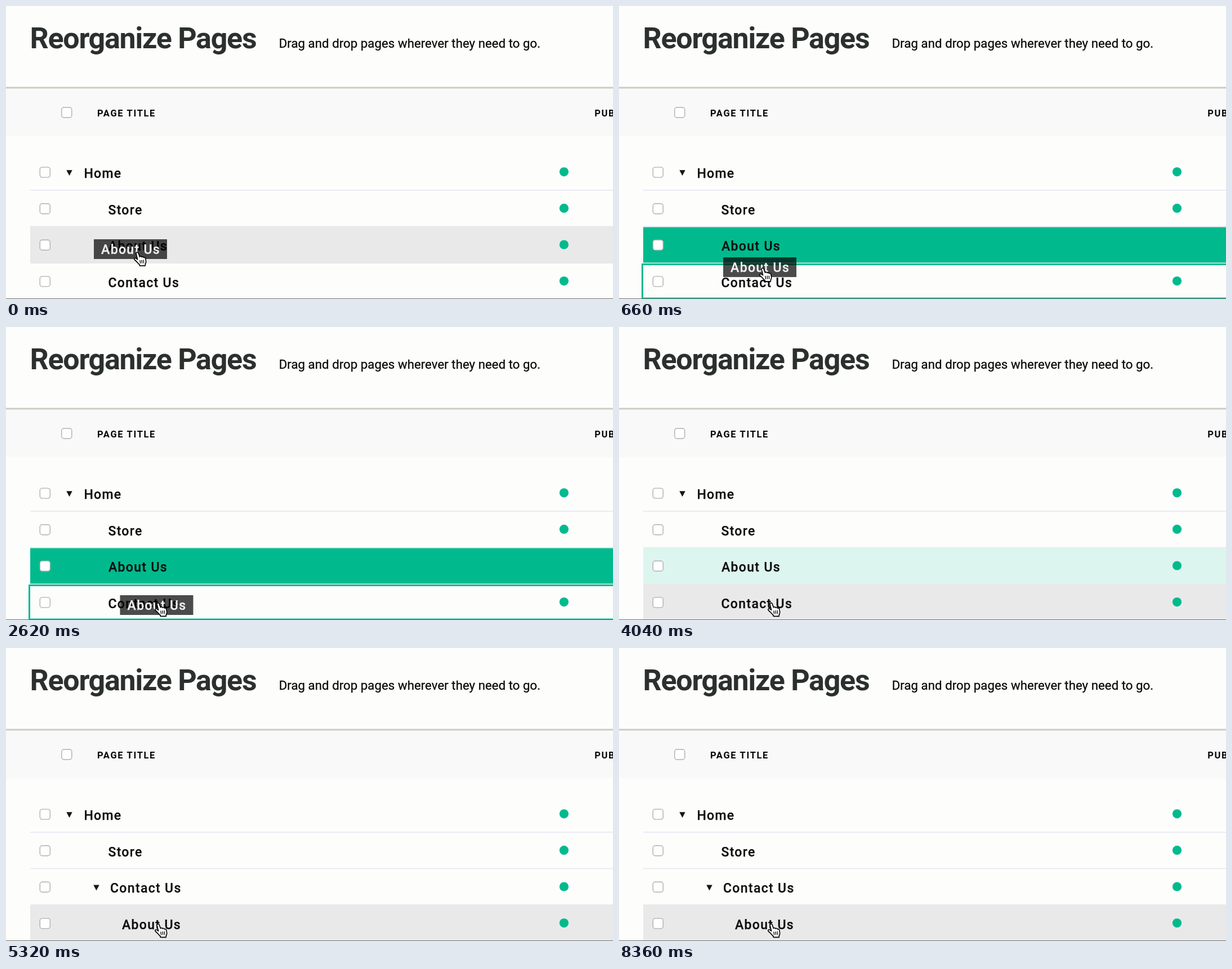
An HTML page for the animation above (8400 ms loop, 1078 by 520 pixels).

```html
<!DOCTYPE html>
<html lang="en">
<head>
<meta charset="utf-8">
<title>Reorganize Pages</title>
<style>
  html, body { margin: 0; width: 100%; height: 100%; overflow: hidden; background: #fdfdfc; }
  svg { display: block; width: 1078px; height: 520px; font-family: Roboto, Arial, sans-serif; }
  .title { font-size: 52px; font-weight: 700; letter-spacing: -1.3px; fill: #2b302f; }
  .lead { font-size: 22.3px; fill: #0b0b0b; stroke: #0b0b0b; stroke-width: .3px; }
  .head { font-size: 16.5px; font-weight: 700; letter-spacing: 1.65px; fill: #080808; }
  .row { font-size: 23px; font-weight: 500; letter-spacing: 1.33px; fill: #0d0d0d; stroke: #0d0d0d; stroke-width: .25px; }
  .light { fill: #f2f2f2; stroke: #f2f2f2; }
  .rule { fill: #e7e9f2; }
  .box { fill: #fff; stroke: #b0b0b0; stroke-width: 1.4; }
  .green { fill: #00ba8d; }
  .arrow { fill: #161616; }
</style>
</head>
<body>
<svg viewBox="0 0 1078 520" xmlns="http://www.w3.org/2000/svg">
  <defs>
    <path id="handShape" d="M4.2 4.2C3.4 1.4 7 .1 8.1 2.8L10.5 9.3C11.2 8 13.6 8.1 14 9.8C15 8.8 17 9.1 17.4 10.7C18.8 9.9 20.5 10.8 20.8 12.6L21.6 17C22 19.6 20.8 21 20.3 22.6V25H10.2V23.3C7.3 20.8 5.3 17.4 1.5 14.7C-.3 13.1 1.7 10.7 4 12.1L6.6 14Z"/>
  </defs>
  <rect width="1078" height="520" fill="#fdfdfc"/>
  <text class="title" x="42.6" y="75">Reorganize Pages</text>
  <text class="lead" x="484.7" y="74">Drag and drop pages wherever they need to go.</text>

  <rect y="147" width="1078" height="84" fill="#f9f9f9"/>
  <rect y="143.5" width="1078" height="3" fill="#cbcdc5"/>
  <text class="head" x="162" y="196.2">PAGE TITLE</text>
  <text class="head" x="1045.3" y="196.2">PUB</text>

  <g id="rules"></g>
  <rect id="hoverAbout" x="43" y="391" width="1035" height="66" fill="#e9e9e9"/>
  <rect id="dragged" class="green" x="43" y="392.5" width="1035" height="63"/>
  <g id="dropped">
    <rect x="43" y="391" width="1035" height="66" fill="#dcf5ee"/>
    <rect x="43" y="456" width="1035" height="1.5" fill="#e2e8e8"/>
  </g>
  <rect id="hoverLast" x="43" y="456" width="1035" height="64" fill="#e9e9e9"/>
  <g id="marks"></g>

  <path class="arrow" d="M107.3 291.3h10.4l-5.2 10z"/>
  <text class="row" x="138.4" y="305">Home</text>
  <text class="row" x="181.5" y="369.5">Store</text>
  <g id="before">
    <text class="row" x="181.9" y="434">About Us</text>
    <text class="row" x="181.5" y="498.7">Contact Us</text>
  </g>
  <g id="after">
    <path class="arrow" d="M155.3 420.5h10.4l-5.2 10z"/>
    <text class="row" x="185" y="434">Contact Us</text>
    <text class="row" x="205.9" y="498.7">About Us</text>
  </g>

  <rect id="target" x="41.5" y="458.5" width="1060" height="60.5" fill="none" stroke="#00ba8d" stroke-width="3"/>
  <rect y="519" width="1078" height="1" fill="#6d6d6d"/>

  <g id="ghost">
    <rect width="130" height="35" fill="#000" fill-opacity=".7"/>
    <text class="row light" x="13" y="26">About Us</text>
  </g>

  <g id="hand">
    <use href="#handShape" x=".4" y="1.8" opacity=".3"/>
    <use href="#handShape" fill="#fff" stroke="#000" stroke-width="1.6" stroke-linejoin="round"/>
    <path fill="none" stroke="#000" stroke-width="1.3" stroke-linecap="round" d="M11 15.5l.6 5M14.2 15.3l.4 5M17.3 15.2l.3 5"/>
  </g>
</svg>
<script>
const LOOP = 8400;
const START = 100, GREEN = 240, OVER = 480, DROP = 3700, REORDER = 4560, HOVER = 5200;
const $ = id => document.getElementById(id);

function add(parent, tag, attrs) {
  const el = document.createElementNS('http://www.w3.org/2000/svg', tag);
  for (const key in attrs) el.setAttribute(key, attrs[key]);
  $(parent).append(el);
}

function checkbox(x, y) {
  add('marks', 'rect', { class: 'box', x, y, width: 18, height: 18, rx: 4 });
}

checkbox(98.8, 180);
for (let i = 0; i < 4; i++) {
  const y = 294.5 + i * 64.6;
  checkbox(60.3, y - 8.4);
  add('marks', 'circle', { class: 'green', cx: 991, cy: y - .2, r: 8.1 });
  if (i < 3) add('rules', 'rect', { class: 'rule', x: 43, y: 326 + i * 64.6, width: 1035, height: 1.7 });
}

// Each step: time, x, y
const handPath = [[START, 227, 435.8], [660, 249, 463.8], [1450, 264, 488.3]];
const ghostPath = [[START, 156, 414], [660, 185, 446], [1450, 202.5, 476]];

function along(path, t) {
  if (t <= path[0][0]) return path[0].slice(1);
  for (let i = 1; i < path.length; i++) {
    const [t0, x0, y0] = path[i - 1], [t1, x1, y1] = path[i];
    if (t < t1) {
      let k = (t - t0) / (t1 - t0);
      if (i === path.length - 1) k = k * (2 - k);
      return [x0 + (x1 - x0) * k, y0 + (y1 - y0) * k];
    }
  }
  return path[path.length - 1].slice(1);
}

const place = (id, path, t) => $(id).setAttribute('transform', `translate(${along(path, t)})`);
const show = (id, on) => { $(id).style.display = on ? '' : 'none'; };

function draw(t) {
  place('hand', handPath, t);
  place('ghost', ghostPath, t);
  show('ghost', t < DROP);
  show('hoverAbout', t < GREEN);
  show('dragged', t >= GREEN && t < DROP);
  show('target', t >= OVER && t < DROP);
  show('dropped', t >= DROP && t < REORDER);
  show('hoverLast', (t >= DROP && t < REORDER) || t >= HOVER);
  show('before', t < REORDER);
  show('after', t >= REORDER);
}

const begin = performance.now();
function tick() {
  draw((performance.now() - begin) % LOOP);
  requestAnimationFrame(tick);
}
tick();
</script>
</body>
</html>
```
